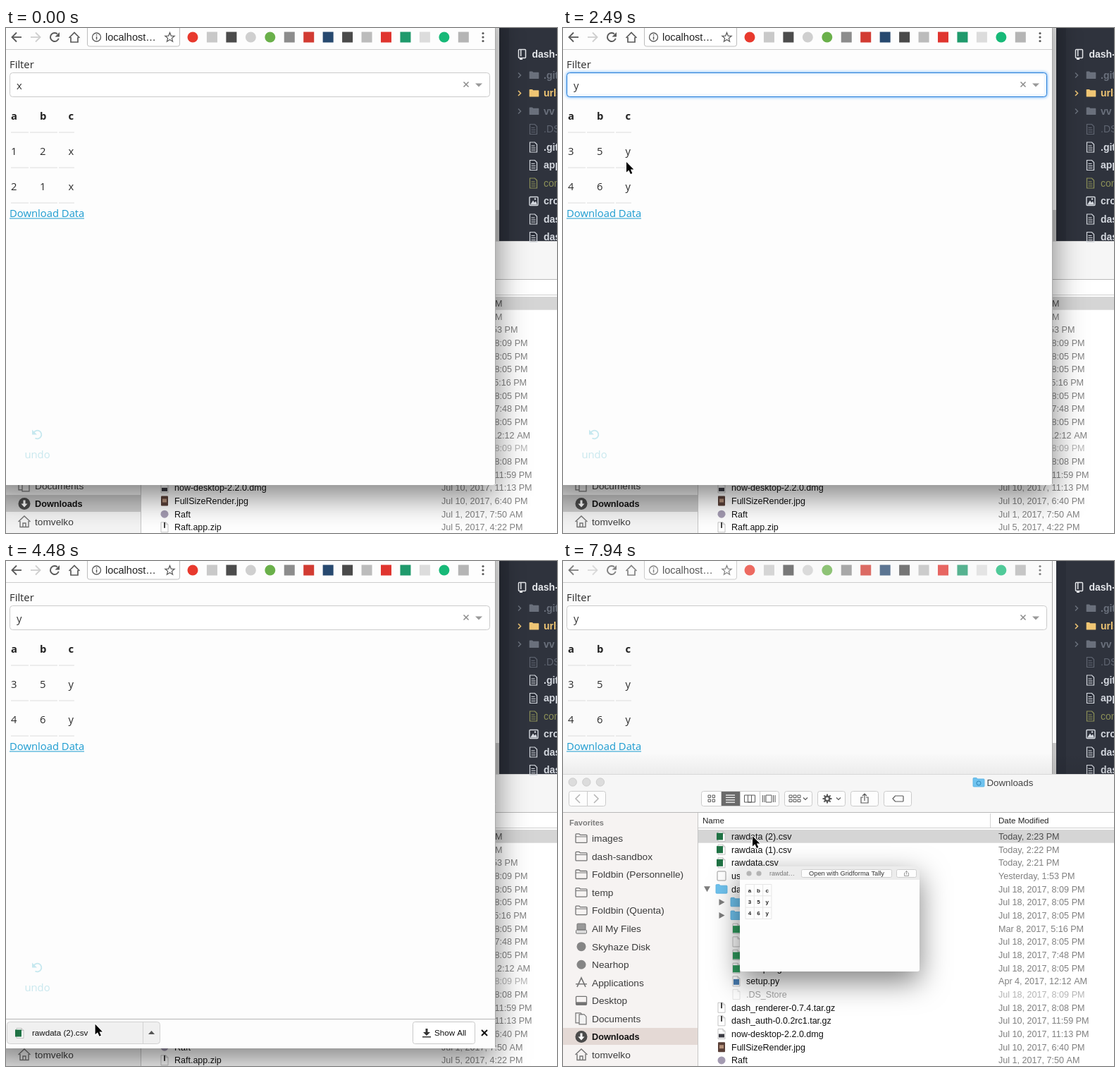
An HTML page with a canvas that plays this animation: 782x716 px, repeating every 8000 ms.

```html
<!DOCTYPE html>
<html lang="en">
<head>
<meta charset="utf-8">
<title>Download data</title>
<style>
html, body { margin: 0; width: 100%; height: 100%; overflow: hidden; background: #fff; }
canvas { display: block; width: 782px; height: 716px; }
</style>
</head>
<body>
<canvas id="stage" width="782" height="716"></canvas>
<script>
const g = document.getElementById('stage').getContext('2d');
const LOOP = 8000;
const SANS = '"Liberation Sans", Arial, sans-serif';
const OPEN = '"Open Sans", sans-serif';

const mix = (a, b, p) => a + (b - a) * p;
// index of the current step of n steps spread over a..b, -1 before a
const step = (t, a, b, n) =>
  t < a ? -1 : Math.min(n - 1, Math.floor((t - a + 10) / ((b - a) / (n - 1))));

function text(s, x, y, size, color, family = SANS, weight = 400, align = 'left') {
  g.font = `${weight} ${size}px ${family}`;
  g.fillStyle = color;
  g.textAlign = align;
  g.fillText(s, x, y);
}
function rect(x, y, w, h, fill) {
  g.fillStyle = fill;
  g.fillRect(x, y, w, h);
}
function box(x, y, w, h, r, fill, stroke, lw = 1) {
  g.beginPath();
  g.roundRect(x, y, w, h, r);
  paint(fill, stroke, lw);
}
function disc(x, y, r, fill, stroke, lw = 1) {
  g.beginPath();
  g.arc(x, y, r, 0, Math.PI * 2);
  paint(fill, stroke, lw);
}
function paint(fill, stroke, lw = 1) {
  if (fill) { g.fillStyle = fill; g.fill(); }
  if (stroke) { g.strokeStyle = stroke; g.lineWidth = lw; g.stroke(); }
}
function line(color, lw, ...p) {
  g.beginPath();
  for (let i = 0; i < p.length; i += 2) g.lineTo(p[i], p[i + 1]);
  paint(null, color, lw);
}
function poly(fill, ...p) {
  g.beginPath();
  for (let i = 0; i < p.length; i += 2) g.lineTo(p[i], p[i + 1]);
  g.closePath();
  paint(fill);
}
function path(d, x, y, fill, stroke, lw = 1) {
  const shape = new Path2D(d);
  g.save();
  g.translate(x, y);
  if (fill) { g.fillStyle = fill; g.fill(shape); }
  if (stroke) { g.strokeStyle = stroke; g.lineWidth = lw; g.stroke(shape); }
  g.restore();
}
function shadow(color, blur, dy) {
  g.shadowColor = color;
  g.shadowBlur = blur;
  g.shadowOffsetY = dy;
}

const FOLDER = 'M-8 -5.5 Q-8 -6.5 -7 -6.5 H-3 L-1.5 -5 H7 Q8 -5 8 -4 V5 Q8 6 7 6 H-7 Q-8 6 -8 5 Z';
const DOC = 'M-5 -7 H2 L5 -4 V7 H-5 Z';

/* ---- pointer ---- */
function pointer(t) {
  const at = (x0, y0, x1, y1, p, kind) => ({ x: mix(x0, x1, p), y: mix(y0, y1, p), kind });
  if (t < 440 || (t >= 5050 && t < 5350)) return null;
  if (t < 1690) {
    const p = (1 - Math.cos(Math.PI * step(t, 440, 1240, 10) / 9)) / 2;
    const c = at(714, 308, 104, 95, p, 'arrow');
    if (c.y < 100) c.kind = 'beam';
    return c;
  }
  if (t < 2670) {
    const p = 1 - (1 - (step(t, 1690, 2130, 6) + 1) / 6) ** 1.8;
    return at(104, 95, 90, 190, p, t < 2490 ? 'hand' : 'arrow');
  }
  if (t < 3820) {
    const c = at(90, 190, 87, 265, (step(t, 2670, 3110, 6) + 1) / 6, 'arrow');
    if (c.y > 254) c.kind = 'hand';
    return c;
  }
  if (t < 4480) return at(87, 265, 112, 655, (step(t, 3820, 4390, 7) + 1) / 7, 'arrow');
  if (t < 5050) return at(112, 655, 185, 664, (step(t, 4480, 4870, 5) + 1) / 5, 'arrow');
  return at(170, 725, 269, 390, (step(t, 5350, 5980, 7) + 1) / 7, 'arrow');
}
function drawPointer({ x, y, kind }) {
  g.lineJoin = 'round';
  if (kind === 'arrow') {
    const d = 'M0 0 V14.5 L3.4 11.4 L5.9 17 L8.3 16 L5.9 10.6 H10.3 Z';
    path(d, x, y, null, '#fff', 2.4);
    path(d, x, y, '#000');
  } else if (kind === 'hand') {
    const thumb = 'M12.5 18 H6 L4.5 15 L.6 10.8 Q0 8.6 2.2 9 L4 10';
    const fingers = 'V1.5 Q4 0 5.2 0 T6.5 1.5 V6 Q9 5 9.2 7 Q11.6 6 11.8 7.8 Q14 7.4 14 9.2 V13 Z';
    path(`${thumb} ${fingers}`, x - 5.2, y, '#fff', '#000', 1.1);
    for (const dx of [2.3, 4.3, 6.3]) line('#000', 1, x + dx, y + 11, x + dx, y + 14.5);
  } else {
    path('M-3 -7 Q0 -7 0 -5 V7 Q0 9 3 9 M3 -7 Q0 -7 0 -5 M0 7 Q0 9 -3 9', x, y, null, '#000', 1.2);
  }
  g.lineJoin = 'miter';
}

/* ---- editor, top right ---- */
const TREE = [
  ['.git', '#6a707c', 'dir'], ['urls', '#f0c674', 'dir'], ['vv', '#6a707c', 'dir'],
  ['.DS_', '#5f6571', 'doc'], ['.gitig', '#d5d9e0', 'doc'], ['app.', '#d5d9e0', 'doc'],
  ['conf', '#8d9158', 'doc'], ['crop', '#d5d9e0', 'pic'], ['dash', '#d5d9e0', 'doc'], ['dash', '#d5d9e0', 'doc']
];
function editor() {
  rect(700, 0, 82, 302, '#2f333d');
  rect(700, 0, 14, 302, '#2a2e38');
  box(727.5, 30.5, 10, 12, 1, null, '#e6e8ec', 1.5);
  rect(730, 30, 1.5, 10, '#e6e8ec');
  rect(729, 42, 4, 3, '#e6e8ec');
  text('dash-s', 746.5, 42, 14, '#e6e8ec', SANS, 700);
  TREE.forEach(([name, color, kind], i) => {
    const y = 67 + i * 25.5;
    if (kind === 'dir') {
      line(color, 1.5, 727, y - 3.5, 730.5, y, 727, y + 3.5);
      g.save();
      g.translate(749.5, y);
      g.scale(.85, .85);
      path(FOLDER, 0, 0, color);
      g.restore();
    } else if (kind === 'doc') {
      path(DOC + ' M-3 -2 H2 M-3 1 H3 M-3 4 H3', 748.5, y, null, color, 1.2);
    } else {
      box(743, y - 6, 12, 12, 1, null, color, 1.4);
      poly(color, 744, y + 5, 748, y - 1, 750, y + 2, 752, y, 754, y + 5);
      disc(751, y - 3, 1.2, color);
    }
    text(name, 763, y + 4.5, 14, color, SANS, i < 3 || color[1] === 'd' ? 700 : 400);
  });
}

/* ---- file manager ---- */
const FILES = [
  ['rawdata (2).csv', 'Today, 2:23 PM', 'csv'],
  ['rawdata (1).csv', 'Today, 2:22 PM', 'csv'],
  ['rawdata.csv', 'Today, 2:21 PM', 'csv'],
  ['usage-denied.gif', 'Yesterday, 1:53 PM', 'gif'],
  ['dash_renderer-0.7.4', 'Jul 18, 2017, 8:09 PM', 'open'],
  ['dash_renderer', 'Jul 18, 2017, 8:05 PM', 'dir', 1],
  ['dash_renderer.egg-info', 'Jul 18, 2017, 8:05 PM', 'dir', 1],
  ['MANIFEST.in', 'Mar 8, 2017, 5:16 PM', 'code', 1],
  ['PKG-INFO', 'Jul 18, 2017, 8:05 PM', 'doc', 1],
  ['README.md', 'Jul 18, 2017, 7:48 PM', 'code', 1],
  ['setup.cfg', 'Jul 18, 2017, 8:05 PM', 'code', 1],
  ['setup.py', 'Apr 4, 2017, 12:12 AM', 'py', 1],
  ['.DS_Store', 'Jul 18, 2017, 8:09 PM', 'dim', 1],
  ['dash_renderer-0.7.4.tar.gz', 'Jul 18, 2017, 8:08 PM', 'zip'],
  ['dash_auth-0.0.2rc1.tar.gz', 'Jul 10, 2017, 11:59 PM', 'zip'],
  ['now-desktop-2.2.0.dmg', 'Jul 10, 2017, 11:13 PM', 'dmg'],
  ['FullSizeRender.jpg', 'Jul 10, 2017, 6:40 PM', 'jpg'],
  ['Raft', 'Jul 1, 2017, 7:50 AM', 'app'],
  ['Raft.app.zip', 'Jul 5, 2017, 4:22 PM', 'zip']
];
const PLACES = ['images', 'dash-sandbox', 'Foldbin (Personnelle)', 'temp', 'Foldbin (Quenta)',
  'All My Files', 'Skyhaze Disk', 'Nearhop', 'Applications', 'Desktop', 'Documents', 'Downloads', 'tomvelko'];

function fileIcon(kind, x, y) {
  if (kind === 'dir' || kind === 'open') return path(FOLDER, x, y, '#6fc3ef', '#55b0e2', .8);
  if (kind === 'jpg') {
    box(x - 5, y - 7, 10, 14, 1, '#5a4038');
    return rect(x - 3, y - 3, 6, 5, '#b5927c');
  }
  if (kind === 'app') return disc(x, y, 5.5, '#a49bb2');
  if (kind === 'gif') return box(x - 6, y - 6.5, 12, 13, 1, '#fff', '#999');
  path(DOC + ' M2 -7 V-4 H5', x, y, '#fff', kind === 'dim' ? '#ddd' : '#b4b4b4', .8);
  if (kind === 'csv') rect(x - 7, y - 5, 9, 10, '#1f7244');
  if (kind === 'code') rect(x - 5, y - 4, 10, 10, '#2f9a5d');
  if (kind === 'py') rect(x - 4, y - 3, 8, 8, '#4679ac');
  if (kind === 'zip') rect(x - 1, y - 7, 2, 8, '#444');
  if (kind === 'dmg') rect(x - 4, y, 8, 5, '#3c3c44');
}
function placeIcon(i, y) {
  const x = 26, c = '#747474';
  if (i < 5) {
    path(FOLDER, x, y, null, c, 1.3);
    line(c, 1, x - 8, y - 2.5, x + 8, y - 2.5);
  } else if (i === 5) {
    box(x - 6, y - 7, 12, 9, 1, '#999', c);
    box(x - 7.5, y + 2, 15, 5, 1, '#ddd', c);
  } else if (i < 8) disc(x, y, 6.5, '#858585');
  else if (i === 8) {
    line(c, 1.6, x - 6, y + 6, x, y - 7, x + 6, y + 6);
    line(c, 1.4, x - 8, y + 2, x + 8, y + 2);
  } else if (i === 9) {
    box(x - 7.5, y - 6, 15, 12, 1, null, c, 1.3);
    rect(x - 7, y + 2, 14, 4, c);
  } else if (i === 10) {
    path(DOC, x - 3, y - 1, null, c, 1.2);
    path(DOC, x + 2, y + 1, '#f3f3f3', c, 1.2);
  } else if (i === 11) {
    disc(x, y, 8.5, '#4a4a4a');
    path('M-1.5 -5 H1.5 V0 H4.5 L0 5 L-4.5 0 H-1.5 Z', x, y, '#fff');
  } else {
    path('M-8.5 0 L0 -8 L8.5 0 M-6 -1 V7.5 H6 V-1 M-2 7 V2 H2 V7', x, y, null, c, 1.4);
  }
}
function toolbar(active, tinted) {
  const c = tinted ? '#5a5a5a' : '#979797', edge = '#cbcbcb', cy = 337;
  const grad = g.createLinearGradient(0, 303, 0, 356);
  grad.addColorStop(0, active ? '#e8e7e8' : '#f6f6f6');
  grad.addColorStop(1, active ? '#d9d8d9' : '#f6f6f6');
  rect(0, 303, 782, 53, grad);
  line('#d8d8d8', 1, 0, 302.5, 782, 302.5);
  ['#fc5b57', '#fdbc40', '#34c84a'].forEach((col, i) =>
    disc(13.7 + i * 19.6, 313.5, 5.7, active ? col : '#dcdcdc', active ? 'rgba(0,0,0,.12)' : '#c6c6c6', .8));
  path(FOLDER, 590, 314, '#6fc3ef', '#55b0e2', .8);
  disc(590, 315, 3, null, '#2f86b8');
  text('Downloads', 601.5, 318.5, 13.3, tinted ? '#444' : '#858585');

  [[8, 52], [196, 110], [314, 39], [361, 39], [408, 39], [455, 39]].forEach(([x, w]) =>
    box(x + .5, 326.5, w, 21, 3, '#fdfdfd', edge));
  rect(224, 327, 27, 20, tinted ? '#6a6a6a' : '#dcdcdc');
  [34, 224, 251, 279].forEach(x => line(edge, 1, x + .5, 327, x + .5, 347));
  line('#b5b5b5', 1.5, 24, 331, 18, cy, 24, 343);
  line('#b5b5b5', 1.5, 44, 331, 50, cy, 44, 343);
  for (const dx of [0, 6]) for (const dy of [0, 6]) {
    box(206 + dx, 332 + dy, 3.5, 3.5, 0, null, c);
    box(321 + dx, 332 + dy, 4, 3.5, 0, null, c);
  }
  box(333, 332, 4, 3.5, 0, null, c);
  box(333, 338, 4, 3.5, 0, null, c);
  for (let i = 0; i < 4; i++) line(tinted ? '#fff' : c, 1.2, 231, 332 + i * 3.4, 244, 332 + i * 3.4);
  box(257.5, 332, 15, 10, 0, null, c);
  line(c, 1, 262.5, 332, 262.5, 342, 267.5, 342, 267.5, 332);
  box(288, 332, 8, 10, 0, null, c);
  for (const x of [283.5, 286, 298.5, 301]) line(c, 1, x, 332, x, 342);
  for (const x of [344, 391]) line(c, 1.2, x - 3, 335.5, x, 338.5, x + 3, 335.5);
  for (let i = 0; i < 4; i++) {
    const a = i * Math.PI / 4, dx = 6.5 * Math.cos(a), dy = 6.5 * Math.sin(a);
    line(c, 2, 375 - dx, cy - dy, 375 + dx, cy + dy);
  }
  disc(375, cy, 4.5, c);
  disc(375, cy, 2, '#fdfdfd');
  path('M-2 -2 H-5 V6 H5 V-2 H2 M0 3 V-7 M-3 -4 L0 -7 L3 -4', 428, cy, null, c, 1.2);
  path('M-7 0 L-3.5 -4 H7 Q8 -4 8 -3 V3 Q8 4 7 4 H-3.5 Z', 475, cy, null, c, 1.2);
}
function files(t) {
  const tinted = t >= 5350, active = tinted && t < 7770;
  if (t >= 5050) {
    const top = g.createLinearGradient(0, 272, 0, 303);
    top.addColorStop(0, 'rgba(0,0,0,0)');
    top.addColorStop(1, 'rgba(0,0,0,.06)');
    rect(0, 272, 782, 31, top);
  }
  rect(0, 303, 782, 413, '#fff');
  toolbar(active, tinted);
  rect(0, 356, 191, 360, tinted ? '#f6f3f2' : '#f4f4f4');
  line('#b9b9b9', 1, 0, 356.5, 782, 356.5);
  line('#c6c6c6', 1, 191.5, 357, 191.5, 716);
  text('Favorites', 9, 374.5, 11, '#7b7b7b', SANS, 700);
  PLACES.forEach((name, i) => {
    const y = 393.4 + i * 25.55, on = i === 11;
    if (on) rect(0, 662, 191, 24, tinted ? '#e4d9d5' : '#cbcbcb');
    placeIcon(i, y);
    text(name, 41, y + 4.8, on ? 12.7 : 13.7, on ? '#111' : '#3c3c3c', SANS, on ? 700 : 400);
  });

  text('Name', 198, 371.5, 11.6, '#222');
  text('Date Modified', 618, 371.5, 11.6, '#222');
  line('#d4d4d4', 1, 606.5, 358, 606.5, 378);
  line('#d0d0d0', 1, 192, 378.5, 782, 378.5);
  const list = t < 5140 ? FILES.slice(1) : FILES;
  const picked = FILES[t < 6430 ? 1 : 0];
  list.forEach((f, i) => {
    let [name, date, kind, depth = 0] = f;
    const y = 390.5 + i * 18.67, x = 225 + depth * 21, on = f === picked, blue = on && active;
    if (on) rect(192, y - 9.5, 590, 18.7, blue ? '#0a68d8' : '#d5d5d5');
    if (f === FILES[0] && t < 5620) { name += '.crdownload'; kind = 'doc'; }
    if (kind === 'open') poly('#7d7d7d', 200, y - 4, 209, y - 4, 204.5, y + 4);
    if (kind === 'dir') poly('#7d7d7d', 221.5, y - 4.5, 229.5, y, 221.5, y + 4.5);
    fileIcon(kind, x, y);
    const dim = kind === 'dim';
    text(name, x + 14, y + 4.5, 12.5, blue ? '#fff' : dim ? '#a4a4a4' : '#111');
    text(date, 618, y + 4.5, 12.6, blue ? '#fff' : on ? '#4c4c4c' : dim ? '#b4b4b4' : '#808080');
  });
}

/* ---- browser ---- */
const BADGES = ['o#e8392d', 's#c9c9c9', 's#4c4c4c', 'o#cfcfcf', 'o#6ab04a', 's#8c8c8c', 's#d23b32', 's#27496f',
  's#4a4a4a', 's#bcbcbc', 's#e0352f', 's#1f9a6c', 's#dcdcdc', 'o#17b978', 's#b5b5b5'];
// status label for the hovered link; the columns are escaped as in an address
const LINK_LABEL = ['data', 'text/csv;charset=utf-8,' + encodeURIComponent('a,b,') + '…'].join(':');

function chromeBar(front) {
  const c = '#5a5a5a';
  g.save();
  if (!front) g.globalAlpha = .75;
  line(c, 1.8, 22, 13, 9, 13);
  line(c, 1.8, 15, 6.5, 8.5, 13, 15, 19.5);
  line('#cfcfcf', 1.8, 35, 13, 48, 13);
  line('#cfcfcf', 1.8, 42, 6.5, 48.5, 13, 42, 19.5);
  g.beginPath();
  g.arc(69, 13, 6, .3, 5.4);
  paint(null, c, 1.9);
  poly(c, 76, 6, 76, 12.5, 69.5, 12.5);
  path('M-7.5 1 L0 -6.5 L7.5 1 M-5 0 V7 H5 V0', 97, 13, null, c, 1.7);
  box(115.5, -4, 131, 30, 3, '#fff', '#bdbdbd');
  disc(128.5, 13, 6, null, c, 1.3);
  rect(127.8, 12, 1.5, 4.5, c);
  rect(127.8, 9, 1.5, 1.6, c);
  text('localhost…', 141, 18, 14.5, '#222');
  g.beginPath();
  for (let i = 0; i < 10; i++) {
    const a = i * Math.PI / 5 - Math.PI / 2, r = i % 2 ? 3 : 7;
    g.lineTo(232.5 + r * Math.cos(a), 13.5 + r * Math.sin(a));
  }
  g.closePath();
  paint(null, c, 1.2);
  BADGES.forEach((b, i) => {
    const x = 265 + i * 27.45, col = b.slice(1);
    if (b[0] === 'o') disc(x, 13, 7.5, col);
    else rect(x - 7.5, 5.5, 15, 15, col);
  });
  for (const y of [7.5, 13, 18.5]) disc(677, y, 1.6, c);
  g.restore();
  line('#cdcdcd', 1, 0, 30.5, 694, 30.5);
}
function select(value, open, focus) {
  g.save();
  if (focus) shadow('rgba(0,126,255,.6)', 4, 0);
  box(5.5, 63.5, 681, 34, open ? [4, 4, 0, 0] : 4, '#fff', focus ? '#2a7fd6' : open ? '#bcbcbc' : '#cbcbcb');
  g.restore();
  text(value, 15, 87, 14.8, '#333', OPEN);
  line('#8f8f8f', 1.6, 649.5, 76.5, 656.5, 83.5);
  line('#8f8f8f', 1.6, 656.5, 76.5, 649.5, 83.5);
  if (open) {
    poly('#999', 666, 83.5, 676, 83.5, 671, 78.5);
    rect(15.5, 73, 1, 18, '#222');
  } else poly('#999', 666, 78.5, 676, 78.5, 671, 83.5);
}
function menu(t) {
  // the highlight trails the pointer by one step
  const before = pointer(t - 88).y;
  const focus = before < 98 ? 1 : Math.min(2, Math.floor((before - 98) / 39.7));
  box(5.5, 97.5, 681, 119, [0, 0, 4, 4], '#fff', '#cbcbcb');
  ['all', 'x', 'y'].forEach((s, i) => {
    const y = 98 + i * 39.6;
    if (i === focus || i === 1) rect(6, y, 680, 39.6, i === focus ? '#ebf3fd' : '#f5faff');
    text(s, 15, y + 25, 14.8, i === focus || i === 1 ? '#333' : '#666', OPEN);
  });
}
function table(rows) {
  const cols = [7, 48, 88.5];
  cols.forEach((x, i) => text('abc'[i], x, 129.5, 14.8, '#222', OPEN, 700));
  rows.forEach((row, j) => cols.forEach((x, i) =>
    text(row[i], x, 179.7 + j * 50, 14.8, '#2c2c2c', OPEN)));
  for (const y of [148, 198, 248])
    for (const [a, b] of [[7, 32], [34, 73], [75, 97]]) rect(a, y - .5, b - a, 1, '#dedede');
}
function flyingArrow(k) {
  const y = [345, 493, 598][k];
  g.save();
  g.beginPath();
  g.rect(0, 31, 694, 618);
  g.clip();
  g.globalAlpha = [.4, .82, .45][k];
  const grad = g.createLinearGradient(0, y, 0, y + 114);
  grad.addColorStop(0, '#7890c2');
  grad.addColorStop(1, '#8198c6');
  box(2, y + 1, 116, 112, 9, grad, '#c3c8cf', 3);
  poly('#fff', 38, y + 21, 80, y + 21, 80, y + 50, 98, y + 59, 59, y + 95, 21, y + 59, 38, y + 50);
  g.restore();
}
function shelf(t, h) {
  g.save();
  g.beginPath();
  g.rect(0, 648, 694, h);
  g.clip();
  rect(0, 648, 694, 43, '#fdfdfd');
  line('#b5b5b5', 1, 0, 649.5, 694, 649.5);
  box(577.5, 653.5, 88, 31, 3, '#fff', '#c9c9c9');
  path('M-1.5 -6 H1.5 V-1 H5 L0 4 L-5 -1 H-1.5 Z M-6 5 H6 V6.5 H-6 Z', 597, 669, '#333');
  text('Show All', 608, 673, 11.6, '#111');
  line('#111', 2, 675, 665, 683, 673);
  line('#111', 2, 683, 665, 675, 673);
  if (t >= 3640) {
    g.beginPath();
    g.rect(0, 650, Math.min(220, 82 * (step(t, 3640, 4390, 9) + 1)), 41);
    g.clip();
    box(1.5, 653.5, 217, 31, 4, t >= 4390 ? '#f0f0f0' : '#fff', '#d2d2d2');
    if (t < 4480) disc(18.5, 669.5, 12.5, '#eaf2f9', '#a9c4dc', 1.5);
    fileIcon('csv', 20, 669.5);
    text('rawdata (2).csv', 37, 673, 11.6, '#111');
    line('#d2d2d2', 1, 194.5, 654, 194.5, 684);
    poly('#555', 202, 671, 211, 671, 206.5, 666);
  }
  g.restore();
}
function browser(t) {
  const front = t < 5050;
  const h = t < 3280 ? 0 : 21.5 * step(t, 3280, 3460, 3);
  const c = pointer(t), onLink = t > 2600 && t < 3820 && c && c.kind === 'hand';
  rect(694, 0, 6, 258, '#f9f9f9');
  rect(694, 258, 6, 44, '#c4c4c4');
  g.save();
  if (front) shadow('rgba(0,0,0,.5)', 46, 16);
  box(-30, -40, 724.5, 688 + h, 4, front ? '#fdfdfd' : '#fafafa');
  g.restore();
  line('#a8a8a8', 1, 694.5, 0, 694.5, 646 + h);
  chromeBar(front);

  text('Filter', 5, 57, 14.8, '#2c2c2c', OPEN);
  const open = t >= 1510 && t < 2400;
  select(t < 2400 ? 'x' : 'y', open, t >= 2400 && t < 3280);
  table(t < 2490 ? ['12x', '21x'] : ['35y', '46y']);
  const blue = onLink ? '#1486bd' : '#1b9bd0';
  text('Download Data', 5, 268, 14.8, blue, OPEN);
  rect(5, 269.5, 106, 1, blue);
  if (open) menu(t);

  g.beginPath();
  g.arc(44.5, 576.5, 5.8, 3.7, 8.4);
  paint(null, '#c6e8ef', 1.8);
  poly('#c6e8ef', 37, 569.5, 37, 576.5, 44, 576.5);
  text('undo', 44.5, 610, 14.8, '#c9e8ee', OPEN, 400, 'center');

  const fly = step(t, 3640, 4390, 9);
  if (fly >= 0 && fly < 3) flyingArrow(fly);
  if (onLink || (t >= 3820 && t < 3910)) {
    box(-4.5, 631.5, 233, 17, 3, '#fff', '#b2b2b2');
    text(LINK_LABEL, 1, 643, 11.9, '#222');
  }
  if (h) shelf(t, h);
}

/* ---- quick preview ---- */
function preview(t) {
  const p = (step(t, 7770, 7940, 3) + 1) / 3;
  g.save();
  g.translate(mix(218, 251, p), mix(381, 433, p));
  g.scale(mix(.08, 1, p), mix(.12, 1, p));
  g.save();
  shadow('rgba(0,0,0,.5)', 40, 14);
  box(0, 0, 255, 149, 3, '#fdfdfd');
  g.restore();
  box(0, 0, 255, 19, [3, 3, 0, 0], '#ececec');
  for (const x of [13, 27]) disc(x, 10, 3.6, '#b4b4b4');
  text('rawdat…', 42, 13, 9, '#777');
  box(87.5, 4.5, 128, 11, 2, '#fdfdfd', '#cfcfcf');
  text('Open with Gridforma Tally', 151.5, 13, 9.3, '#333', SANS, 400, 'center');
  box(222.5, 4.5, 28, 11, 2, '#fdfdfd', '#cfcfcf');
  path('M-2 -1 H-3 V3 H3 V-1 H2 M0 1 V-4 M-2 -2 L0 -4 L2 -2', 236.5, 10.5, null, '#888', .8);
  for (let i = 0; i < 4; i++) {
    line('#e6e6e6', 1, 8, 25.5 + i * 16.3, 45, 25.5 + i * 16.3);
    line('#e6e6e6', 1, 8 + i * 12.3, 25.5, 8 + i * 12.3, 74.5);
  }
  ['abc', '35y', '46y'].forEach((row, j) => [...row].forEach((s, i) =>
    text(s, 14 + i * 12.4, 36.5 + j * 16.4, 8, '#222', SANS, 700, 'center')));
  g.restore();
}

function draw(t) {
  rect(0, 0, 782, 716, '#fff');
  if (t < 5050) {
    files(t);
    editor();
    browser(t);
  } else {
    browser(t);
    editor();
    files(t);
    if (t >= 7770) preview(t);
  }
  const c = pointer(t);
  if (c) drawPointer(c);
}
function tick() {
  draw(performance.now() % LOOP);
  requestAnimationFrame(tick);
}
tick();
</script>
</body>
</html>
```
